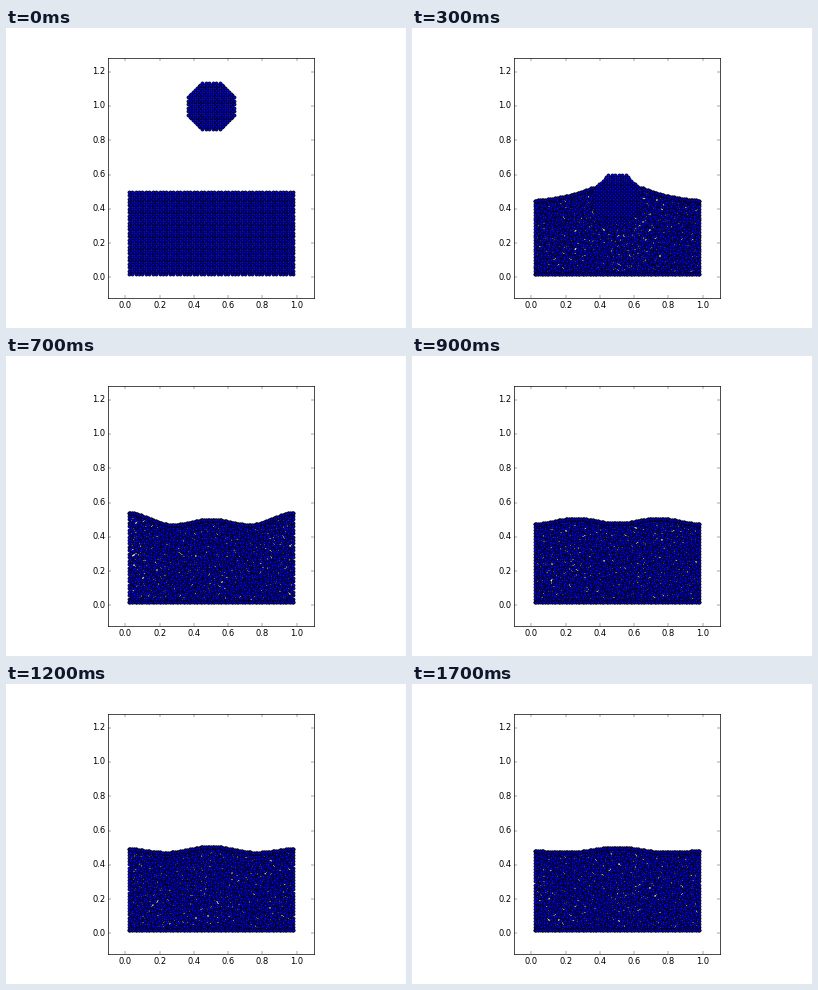
A matplotlib script that plays this animation: 400 by 300 pixels, repeating every 1.8 s.

```python
import numpy as np
import matplotlib.pyplot as plt
from matplotlib.animation import FuncAnimation

FRAMES, INTERVAL = 18, 100
LEFT, RIGHT, FLOOR, REST = 0.02, 0.98, 0.02, 0.50
FALL = 0.06                      # half of gravity, per frame squared
SPLASH, CRATER, CALM = 3, 5, 7   # frames at which the water changes regime
COLS, ROWS = 97, 27

rng = np.random.default_rng(4)
phase = rng.uniform(0, 2 * np.pi, (2, ROWS, COLS))
order = rng.permutation(ROWS * COLS)
spray_x = 0.27 + 0.022 * (np.arange(90) % 10 + rng.uniform(0, 0.9, 90))
spray_lift = ((np.arange(90) // 10 + rng.uniform(0, 1, 90)) / 9) ** 1.3


def points(x, y):
    return np.column_stack([np.ravel(x), np.ravel(y)])


def block(top):
    """Resting pool: a square grid with a second one in its gaps."""
    i, j = np.meshgrid(np.arange(97), np.arange(49))
    keep = (i + j) % 2 == 0
    return points(LEFT + (RIGHT - LEFT) * i[keep] / 96,
                  FLOOR + (top - FLOOR) * j[keep] / 48)


def disc(t):
    i, j = np.meshgrid(np.arange(-13, 14), np.arange(-13, 14))
    keep = ((i + j) % 2 == 0) & (i**2 + j**2 < 196)
    step = 0.0104
    return points(0.5 + step * i[keep], 1 - FALL * t**2 + step * j[keep])


def splash(x):
    return np.minimum(0.43 + 0.19 * np.exp(-np.abs(x - 0.5) / 0.2), 0.52)


def crater(x):
    return 0.585 - 0.245 * np.exp(-((x - 0.5) / 0.16) ** 2)


def sway(x, t):
    """Two damped standing waves on a slowly settling level."""
    n = t - CALM
    level = 0.481 + 0.016 * np.exp(-0.25 * n)
    wide = 0.021 * np.exp(-0.04 * n) * np.cos(0.868 * n)
    narrow = 0.025 * np.exp(-0.11 * n) * np.cos(1.228 * n)
    return level + wide * np.cos(2 * np.pi * x) + narrow * np.cos(4 * np.pi * x)


def surface(x, t):
    if t >= CALM:
        return sway(x, t)
    if t >= CRATER:
        start, end, mix = crater(x), sway(x, CALM), (t - CRATER) / (CALM - CRATER)
    else:
        start, end, mix = splash(x), crater(x), (t - SPLASH) / (CRATER - SPLASH)
    return start + (end - start) * mix


def spray(t):
    """Drops over the crater, mirrored, and a thin jet in the middle."""
    top = 0.56 - 0.05 * (t - CRATER) ** 2
    low = surface(spray_x, t)
    keep = top > low
    x, y = spray_x[keep], (low + spray_lift * (top - low))[keep]
    jet = np.arange(surface(0.5, t) - 0.03, top, 0.01)
    return [points(x, y), points(1 - x, y), points(np.full(jet.size, 0.5), jet)]


def water(t):
    i, j = np.meshgrid(np.arange(COLS), np.arange(ROWS))
    x = LEFT + (RIGHT - LEFT) * i / (COLS - 1)
    depth = np.minimum((j + 0.5 * (i % 2)) / (ROWS - 1), 1)
    y = FLOOR + depth * (surface(x, t) - FLOOR)
    wobble = 0.004 * np.cos(phase + 0.9 * t)
    wobble[:, [0, -2, -1]] = 0
    wobble[:, :, [0, -1]] = 0
    rim = np.linspace(LEFT, RIGHT, COLS)
    parts = [points(x + wobble[0], y + wobble[1])[order],
             points(rim, np.full(COLS, FLOOR)), points(rim, surface(rim, t))]
    if t == SPLASH:
        parts.append(disc(t))
    elif t < CALM:
        parts += spray(t)
    return np.vstack(parts)


def particles(t):
    if t < SPLASH:
        return np.vstack([block(REST - 0.0065 * t**2), disc(t)])
    return water(t)


plt.rcParams.update({"font.family": "DejaVu Sans", "font.size": 12,
                     "axes.linewidth": 1.0})
fig, ax = plt.subplots(figsize=(8, 6), dpi=50, facecolor="white")
fig.subplots_adjust(left=0.125, right=0.9, bottom=0.1, top=0.9)
ax.set_aspect("equal")
ax.set_xlim(-0.1, 1.1)
ax.set_ylim(-0.12, 1.28)
ax.set_xticks(np.arange(6) * 0.2)
ax.set_yticks(np.arange(7) * 0.2)
ax.xaxis.set_major_formatter("{x:.1f}")
ax.yaxis.set_major_formatter("{x:.1f}")
ax.tick_params(direction="in", top=True, right=True, length=4, width=0.5, pad=4)
for label in ax.get_yticklabels():
    label.set_verticalalignment("center")

dots = ax.scatter([], [], s=20, facecolor="blue", edgecolor="black",
                  linewidth=1, zorder=2)


def draw(t):
    dots.set_offsets(particles(t))
    return [dots]


anim = FuncAnimation(fig, draw, frames=FRAMES, interval=INTERVAL,
                     repeat=True, repeat_delay=0, blit=False)
plt.show()
```
